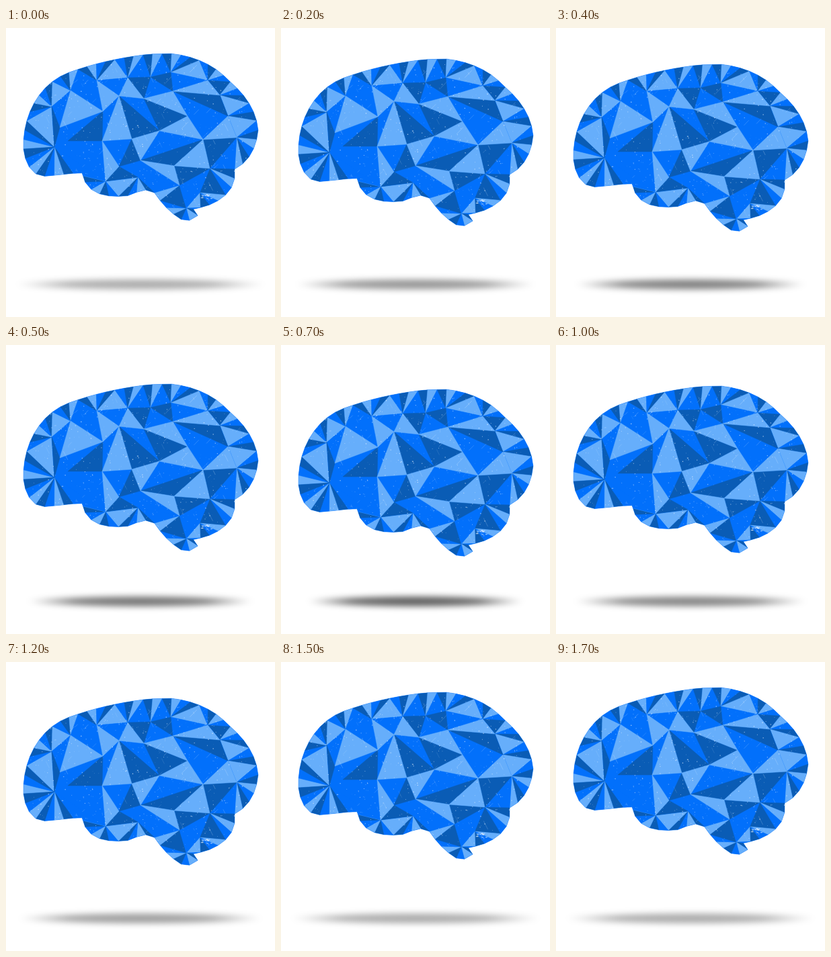
Write an HTML page with a canvas that moves like this. It is 400 px wide and 430 px high and loops after 1.8 s.

```html
<!DOCTYPE html>
<html lang="en">
<head>
<meta charset="utf-8">
<title>Floating brain</title>
<style>
  html, body { margin: 0; width: 100%; height: 100%; overflow: hidden; background: #fff; }
  canvas { display: block; width: 400px; height: 430px; }
</style>
</head>
<body>
<canvas id="stage" width="400" height="430"></canvas>
<script>
const W = 400, H = 430, LOOP = 1800, STEP = 100;
const BLUE = '#0270fb', DARK = '#0a5cb5', LIGHT = '#66aefb';

const SILHOUETTE = 'M26 180C24 130 50 80 97 65Q150 46 213 39L245 38Q300 44 331 78' +
  'Q372 112 375 153Q370 195 340 210Q345 250 292 267L277 268 287 278 268 289' +
  'Q240 275 220 244Q205 236 186 249Q120 258 113 215L53 221Q30 214 26 180Z';

// Hubs carry the fan of small facets along the rim; knots shape the big ones.
const hubs = {
  A: [72, 177], B: [68, 117], C: [96, 93], D: [135, 78], E: [181, 74], F: [215, 73],
  G: [245, 66], H: [300, 78], I: [318, 100], J: [330, 131], K: [343, 163], L: [303, 209],
  M: [288, 245], Q: [268, 268], N: [258, 234], O: [196, 222], P: [148, 228]
};
const knots = {
  a: [144, 124], b: [168, 101], c: [187, 165], d: [143, 168], e: [200, 197], f: [228, 153],
  g: [293, 166], h: [270, 131], i: [248, 94], j: [205, 105], k: [250, 205], m: [92, 168],
  n: [168, 206], q: [80, 148]
};
const points = { ...hubs, ...knots };
const darkFacets = 'EFj FGi jhf bfc amd BqA cen egk LkN iIJ gKL OPn';
const lightFacets = 'Dab Caq bdc Ebj jih fhg cfe gLk ekN iHI gJK dnP';

function random(seed) {
  return () => (seed = (seed * 16807) % 2147483647) / 2147483647;
}

function fill(c, pts, color) {
  c.fillStyle = c.strokeStyle = color;
  c.beginPath();
  pts.forEach(p => c.lineTo(...p));
  c.closePath();
  c.fill();
  c.stroke();
}

function sampleRim(count) {
  const path = document.createElementNS('http://www.w3.org/2000/svg', 'path');
  path.setAttribute('d', SILHOUETTE);
  const step = path.getTotalLength() / count;
  return Array.from({ length: count }, (_, i) => {
    const { x, y } = path.getPointAtLength(i * step);
    return [x, y];
  });
}

function nearestHub([x, y]) {
  const dist = p => Math.hypot(p[0] - x, p[1] - y);
  return Object.values(hubs).reduce((best, p) => dist(p) < dist(best) ? p : best);
}

function paintRim(c, rim) {
  const colors = [LIGHT, BLUE, DARK];
  let turn = 0;
  rim.forEach((p, i) => {
    const next = rim[(i + 1) % rim.length];
    const hub = nearestHub(p), nextHub = nearestHub(next);
    fill(c, [p, next, hub], colors[turn++ % 3]);
    if (hub !== nextHub) fill(c, [next, hub, nextHub], colors[turn++ % 3]);
  });
}

function paintFacets(c, words, color) {
  for (const word of words.split(' ')) fill(c, [...word].map(key => points[key]), color);
}

function scratch(c) {
  const rnd = random(4711);
  c.fillStyle = c.strokeStyle = '#e4f1ff';
  for (let i = 0; i < 800; i++) {
    const size = 0.5 + rnd() * 0.9;
    c.globalAlpha = 0.15 + rnd() * 0.6;
    c.fillRect(35 + rnd() * 325, 45 + rnd() * 230, size, size);
  }
  for (let i = 0; i < 80; i++) {
    const x = 40 + rnd() * 310, y = 55 + rnd() * 200;
    const angle = rnd() < 0.6 ? -0.8 : 1.1, len = 3 + rnd() * 12;
    c.globalAlpha = 0.15 + rnd() * 0.35;
    c.beginPath();
    c.moveTo(x, y);
    c.lineTo(x + len * Math.cos(angle), y + len * Math.sin(angle));
    c.stroke();
  }
  // worn patch above the stem
  for (let i = 0; i < 26; i++) {
    c.globalAlpha = 0.3 + rnd() * 0.4;
    c.fillRect(289 + rnd() * 15, 247 + rnd() * 7, 1 + rnd() * 3, 1);
  }
}

function makeBrain() {
  const layer = document.createElement('canvas');
  layer.width = W;
  layer.height = H;
  const c = layer.getContext('2d');
  const rim = sampleRim(70);
  c.lineWidth = 0.5;
  fill(c, rim, BLUE);
  c.clip();
  paintRim(c, rim);
  fill(c, Object.values(hubs), BLUE);
  paintFacets(c, darkFacets, DARK);
  paintFacets(c, lightFacets, LIGHT);
  scratch(c);
  return layer;
}

const ctx = document.getElementById('stage').getContext('2d');
const brain = makeBrain();

// Quick sink, slower rise; the shadow settles before the brain does.
const drop = n => n < 8 ? 4 * n : Math.ceil(28.5 * (17 - n) / 9);
const shade = n => Math.max(0, Math.min(n / 7, (13 - n) / 6));

function drawShadow(near) {
  const alpha = 0.33 + 0.3 * near;
  const g = ctx.createRadialGradient(0, 0, 0, 0, 0, 1);
  g.addColorStop(0, `rgba(0,0,0,${alpha})`);
  g.addColorStop(0.6, `rgba(0,0,0,${alpha * 0.9})`);
  g.addColorStop(1, 'rgba(0,0,0,0)');
  ctx.save();
  ctx.filter = 'blur(4px)';
  ctx.translate(200, 381.5);
  ctx.scale(186 - 24 * near, 9.5);
  ctx.fillStyle = g;
  ctx.fillRect(-1, -1, 2, 2);
  ctx.restore();
}

function draw(now) {
  const n = Math.floor((now % LOOP) / STEP);
  ctx.fillStyle = '#fff';
  ctx.fillRect(0, 0, W, H);
  drawShadow(shade(n));
  ctx.drawImage(brain, 0, drop(n));
}

const start = performance.now();
function tick() {
  draw(performance.now() - start);
  requestAnimationFrame(tick);
}
tick();
</script>
</body>
</html>
```
